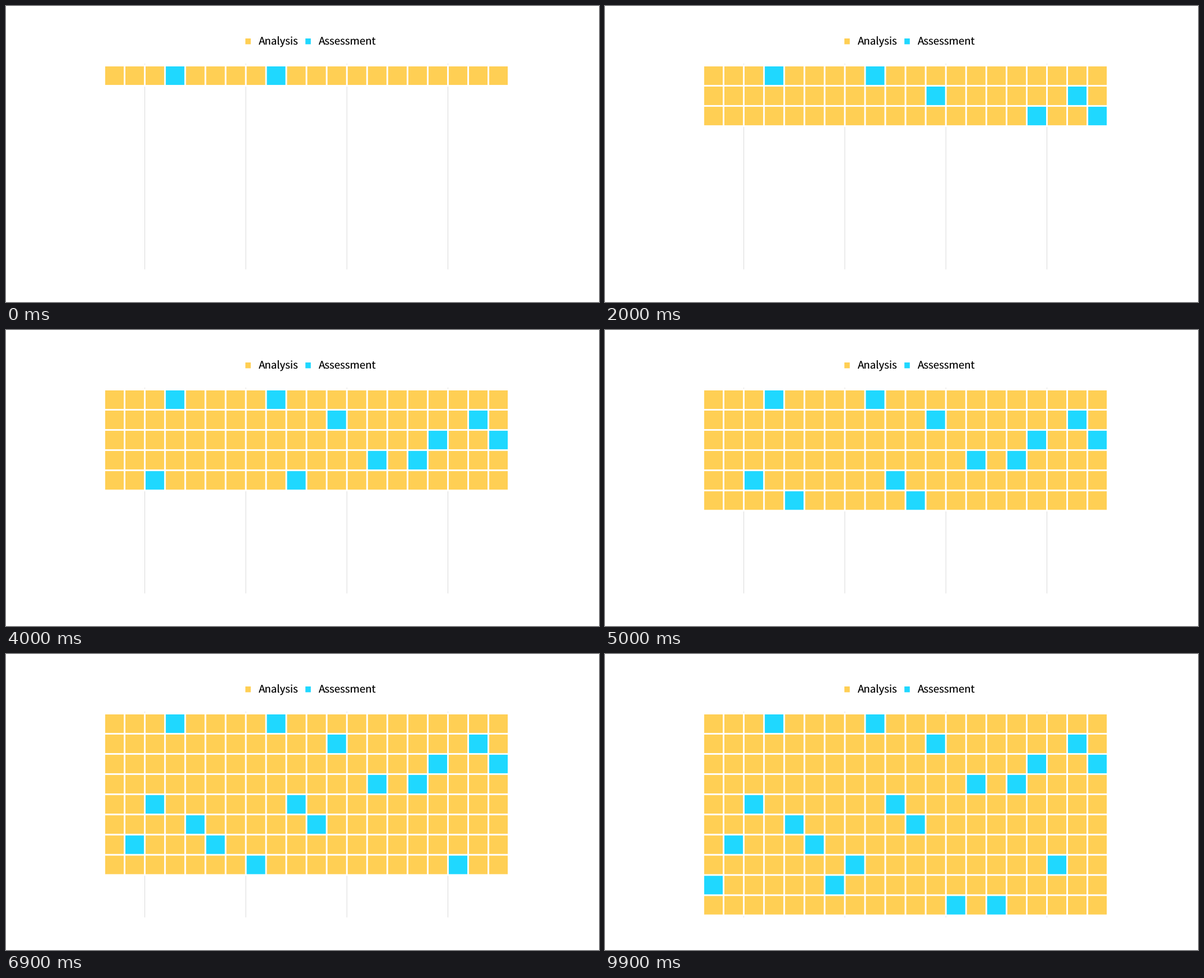
A matplotlib script for the animation above (10 s loop, 1058x529 px).

```python
import matplotlib.pyplot as plt
from matplotlib.animation import FuncAnimation
from matplotlib.patches import Rectangle

plt.rcParams["text.hinting"] = "none"

WIDTH, HEIGHT, DPI = 1058, 529, 72  # at 72 dpi one point is one pixel
INTERVAL, LOOP = 100, 10000
YELLOW, BLUE, GRID = "#FFCF54", "#1FD8FF", "#DADADA"

COLUMNS, PITCH, TILE, BORDER = 20, 36.06, 33.1, 3
FIRST_X, FIRST_Y = 193.5, 124.5

# Columns of the assessment tiles in each row, and when each row appears.
ASSESSED = [(3, 8), (11, 18), (16, 19), (13, 15), (2, 9),
            (4, 10), (1, 5), (7, 17), (0, 6), (12, 14)]
ROW_TIMES = [0, 1000, 2000, 3000, 4000, 5000, 5900, 6900, 7900, 8900]

fig = plt.figure(figsize=(WIDTH / DPI, HEIGHT / DPI), dpi=DPI, facecolor="white")
ax = fig.add_axes([0, 0, 1, 1])
ax.set(xlim=(0, WIDTH), ylim=(HEIGHT, 0))
ax.axis("off")


def add_box(cx, cy, width, height, color, zorder):
    box = Rectangle((cx - width / 2, cy - height / 2), width, height,
                    facecolor=color, linewidth=0, zorder=zorder, snap=False)
    return ax.add_patch(box)


def add_legend_entry(key_x, text_x, label, color):
    add_box(key_x, 63.2, 9.6, 10.4, color, 3)
    ax.text(text_x, 70, label, family="Noto Sans CJK JP", size=18.65,
            color="black", va="baseline")


def build_row(row):
    y = FIRST_Y + row * PITCH
    middle = FIRST_X + (COLUMNS - 1) / 2 * PITCH
    boxes = [add_box(middle, y, COLUMNS * PITCH + BORDER, PITCH + BORDER, "white", 2)]
    for col in range(COLUMNS):
        color = BLUE if col in ASSESSED[row] else YELLOW
        boxes.append(add_box(FIRST_X + col * PITCH, y, TILE, TILE, color, 3))
    return boxes


for col in (1.5, 6.5, 11.5, 16.5):
    x = FIRST_X + col * PITCH
    ax.plot([x, x], [103, 470.7], color=GRID, linewidth=1,
            solid_capstyle="butt", zorder=1, snap=False)

add_legend_entry(431.9, 450, "Analysis", YELLOW)
add_legend_entry(539, 557, "Assessment", BLUE)
rows = [build_row(row) for row in range(len(ASSESSED))]


def update(frame):
    now = frame * INTERVAL
    for start, boxes in zip(ROW_TIMES, rows):
        for box in boxes:
            box.set_visible(now >= start)
    return []


animation = FuncAnimation(fig, update, frames=LOOP // INTERVAL, interval=INTERVAL,
                          init_func=lambda: update(0), repeat=True, repeat_delay=0)
plt.show()
```
